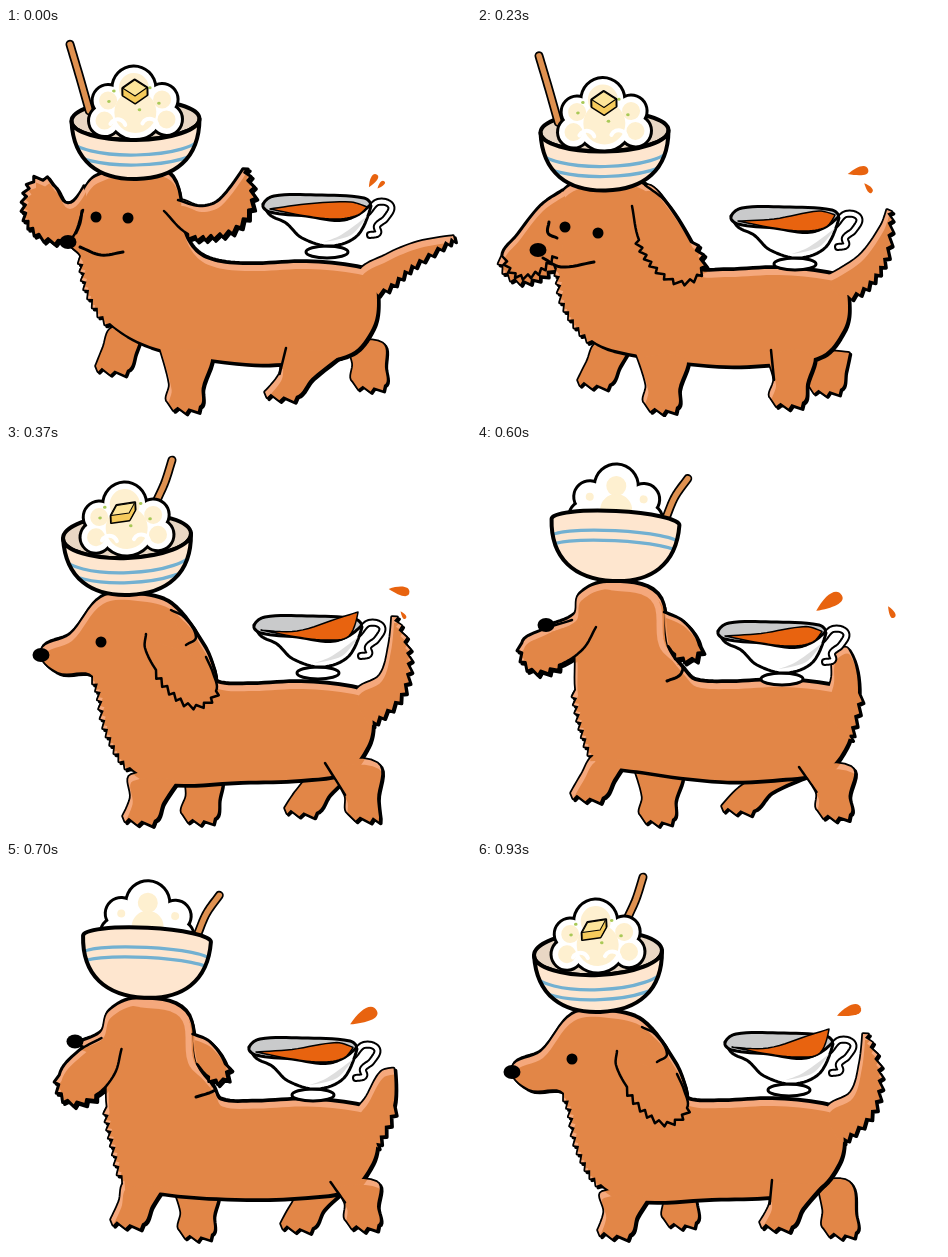
Animation, 465 px wide and 389 px high, one loop 1.06 s. Source, as an HTML page with a canvas:

```html
<!DOCTYPE html>
<html lang="en">
<head>
<meta charset="utf-8">
<title>Dachshund with mash and gravy</title>
<style>
  html, body { margin: 0; width: 100%; height: 100%; overflow: hidden; background: #fff; }
  canvas { display: block; }
</style>
</head>
<body>
<canvas id="stage" width="465" height="389"></canvas>
<script>
const g = document.getElementById('stage').getContext('2d');
const FUR = '#e28647', LIGHT = '#f5a87c', GRAVY = '#e8630f', CREAM = '#fee6cf', LOOP = 1060;

// Outlines are a few key points; a star makes the edge that follows shaggy.
// Legs are [hip x, hip y, half width, foot x, foot y]; drops are [x, y, length, angle].
const BARREL = '240,335 300,333 345,325 366,300 371,275 366,248 350,240 300,235 250,237 215,235';

const start = {
  front: '130,140 90,149 77,165 74,190 62,212 75,228* 83,262* 104,295 150,320',
  rear: '192,226 178,205 166,150',
  shift: [0, 0],
  ears: ['78,158 62,175 47,157* 28,154* 20,185* 33,206* 52,212 66,210 77,182',
         '172,172 194,178 213,172 237,141* 245,172* 230,198* 205,207* 182,206 158,183'],
  tail: '352,246 380,227 412,214 447,208* 405,236* 369,263',
  near: [[178, 320, 24, 179, 378], [312, 320, 32, 276, 368]],
  far: [[122, 300, 16, 107, 342], [358, 315, 18, 364, 357]],
  lines: ['74,219 95,227 117,224', '76,183 74,195 70,205'],
  glow: [], eyes: [[90, 189], [122, 190]], nose: [62, 214],
  bowl: [0, 129.5, 92], boat: [0, 0], wave: 0,
  drops: [[367, 153, 15, -1], [375, 157, 10, -.8]]
};

const low = {
  front: '130,150 90,160 73,190 62,214 62,230 80,240* 88,275* 115,312 157,326',
  rear: '202,222 186,190 168,158',
  shift: [0, 6],
  ears: ['86,162 64,177 40,207 25,228* 38,250* 62,247* 80,230',
         '168,157 188,173 214,214* 224,240* 205,253* 180,240* 162,212 155,178'],
  tail: '350,248 382,228 404,198 410,182* 406,230* 371,267',
  near: [[183, 325, 24, 185, 379], [314, 322, 20, 311, 374]],
  far: [[138, 315, 18, 118, 356], [355, 325, 17, 349, 361]],
  lines: ['66,230 84,239 117,234', '72,194 71,205 80,210'],
  glow: [], eyes: [[88, 199], [121, 205]], nose: [61, 222],
  bowl: [0, 127.5, 103.5], boat: [-3, 12], wave: 1,
  drops: [[381, 144, 21, -.2], [391, 160, 12, .9]]
};

const side = {
  front: '130,150 95,153 64,190 35,206 52,227 87,231* 102,284* 124,322 160,338',
  rear: '208,228 198,203 165,160',
  shift: [-5, 3],
  ears: ['140,189 139,203 150,225* 168,248* 190,260* 210,246 207,228 200,212',
         '165,165 178,172 190,192 180,200'],
  tail: '350,247 374,230 383,200 386,172* 400,208* 394,248* 364,277',
  near: [[150, 330, 25, 134, 375], [345, 318, 26, 359, 372]],
  far: [[198, 330, 15, 194, 373], [325, 330, 18, 296, 367]],
  lines: [], glow: [], eyes: [[95, 197]], nose: [35, 210],
  bowl: [1, 121, 91], boat: [-9, 4], wave: 2,
  drops: [[393, 146, 21, .2], null, [397, 170, 9, 1]]
};

const away = {
  front: '130,138 102,150 97,170 72,181 95,195 99,245* 107,285* 122,316 165,326',
  rear: '207,226 190,202 180,150',
  shift: [3, 1],
  ears: ['95,175 62,186 45,198* 55,224* 82,220 106,204 119,182',
         '187,167 207,177 222,200* 215,213* 198,209 191,201'],
  tail: '350,259 355,232 357,210 371,204 381,248* 370,293',
  near: [[135, 310, 17, 111, 352], [348, 322, 26, 358, 369]],
  far: [[180, 325, 22, 181, 374], [305, 332, 22, 262, 365]],
  lines: ['190,236 203,230 207,219'],
  glow: ['128,141 176,153 185,200 200,216'], eyes: [], nose: [69, 180],
  bowl: [2, 138.5, 77], boat: [-16, 10], wave: .8,
  drops: [[414, 167, 13, 1.1], [352, 158, 30, -.55]]
};

const back = {
  front: '130,137 103,150 92,172 70,181 98,200 104,245* 112,285* 122,325 160,337',
  rear: '207,226 190,202 178,150',
  shift: [-4, 6],
  ears: ['96,177 82,193 62,228* 68,252* 97,246 111,220 112,192',
         '186,177 204,184 224,217* 212,225 191,203'],
  tail: '347,253 372,232 407,195* 400,230* 366,274',
  near: [[145, 330, 24, 133, 371], [347, 318, 20, 357, 356]],
  far: [[197, 330, 19, 201, 370], [325, 330, 17, 322, 366]],
  lines: ['190,234 203,232 210,238'],
  glow: away.glow, eyes: [], nose: [69, 179],
  bowl: [2, 143.5, 76.5], boat: [-12, 8], wave: .8,
  drops: [null, [363, 153, 30, -.4]]
};

const rest = {
  ...side,
  near: [[150, 330, 25, 138, 372], [322, 318, 27, 300, 364]],
  far: [[198, 330, 15, 204, 360], [356, 320, 16, 364, 370]],
  drops: [[372, 150, 25, -.3]]
};

// Bowl views: rim sag, tilt, width of the white edge on the mash, spoon, butter [x, y, ux, uy, vx, vy].
const bowls = [
  { sag: 20, tilt: -.02, edge: 7, spoon: '-64,-77 -56,-48 -46,-10', butter: [0, -32, 6, -4, 6, 4] },
  { sag: 22, tilt: -.04, edge: 7, spoon: '48,-74 40,-52 31,-34', butter: [-3, -27, 9, -1, -3, 5] },
  { sag: -11, tilt: .05, edge: 12, spoon: '70,-47 58,-28 50,-6' }
];
const PUFFS = [[-31, 0, 16], [-27, -20, 16], [-1, -32, 22], [27, -20, 16], [31, 0, 16], [0, -8, 28]];

const points = s => s.split(' ').map(p => [...p.replace('*', '').split(',').map(Number), p.endsWith('*')]);
const mid = (a, b) => (a + b) / 2;

function along(p, u) {
  const t = u * (p.length - 1), i = Math.min(Math.floor(t), p.length - 2);
  return [0, 1].map(k => p[i][k] + (p[i + 1][k] - p[i][k]) * (t - i));
}

// Pose halfway between two others.
function between(a, b) {
  if (a == null || b == null) return null;
  if (typeof a === 'number') return mid(a, b);
  if (typeof a === 'string') {
    const p = points(a), q = points(b), long = p.length > q.length ? p : q, n = long.length - 1;
    return long.map((v, i) => {
      const s = along(p, i / n), e = along(q, i / n);
      return mid(s[0], e[0]) + ',' + mid(s[1], e[1]) + (v[2] ? '*' : '');
    }).join(' ');
  }
  if (Array.isArray(a)) return a.slice(0, b.length).map((v, i) => between(v, b[i]));
  return Object.fromEntries(Object.keys(a).map(k => [k, between(a[k], b[k])]));
}

// Smooth curve through key points, sharp at tight turns, with tufts on shaggy edges.
function trace(p, open) {
  const n = p.length, path = new Path2D();
  const at = i => open ? p[Math.max(0, Math.min(n - 1, i))] : p[(i + n) % n];
  const dir = (a, b) => {
    const x = b[0] - a[0], y = b[1] - a[1], d = Math.hypot(x, y) || 1;
    return [x / d, y / d, d];
  };
  const tangent = i => {
    const a = dir(at(i - 1), at(i)), b = dir(at(i), at(i + 1));
    return a[0] * b[0] + a[1] * b[1] < -.2 ? [0, 0] : dir(at(i - 1), at(i + 1));
  };
  const turn = Math.sign(p.reduce((sum, a, i) => sum + a[0] * at(i + 1)[1] - at(i + 1)[0] * a[1], 0));
  for (let i = 0; i < (open ? n - 1 : n); i++) {
    const a = at(i), b = at(i + 1), d = dir(a, b)[2], s = tangent(i), e = tangent(i + 1);
    const pos = t => [0, 1].map(k => {
      const r = 1 - t, c1 = a[k] + s[k] * d / 3, c2 = b[k] - e[k] * d / 3;
      return r * r * r * a[k] + 3 * r * r * t * c1 + 3 * r * t * t * c2 + t * t * t * b[k];
    });
    const steps = a[2] ? Math.max(1, Math.round(d / 9)) : 8;
    for (let k = 0; k < steps; k++) {
      path.lineTo(...pos(k / steps));
      if (!a[2]) continue;
      const t = (k + .75) / steps, [x, y] = pos(t), [dx, dy] = dir(pos(t - .02), pos(t + .02));
      path.lineTo(x + dy * turn * 4.5, y - dx * turn * 4.5);
    }
  }
  if (open) path.lineTo(...p[n - 1]);
  else path.closePath();
  return path;
}

const curve = (s, open) => trace(points(s), open);

function legPoints([hx, hy, w, fx, fy]) {
  const ankle = fx + (hx - fx) * .35;
  return [[hx - w, hy], [ankle - 15, fy - 22], [fx - 17, fy - 4, true],
          [fx + 14, fy], [ankle + 17, fy - 18], [hx + w, hy]];
}

function stroke(path, width, color = '#000') {
  g.strokeStyle = color;
  g.lineWidth = width;
  g.stroke(path);
}

function fill(path, color, edge = 0) {
  g.fillStyle = color;
  g.fill(path);
  if (edge) stroke(path, edge);
}

function oval(x, y, rx, ry, color, edge) {
  const path = new Path2D();
  path.ellipse(x, y, rx, ry, 0, 0, 7);
  fill(path, color, edge);
}

function moved(x, y, draw) {
  g.save();
  g.translate(x, y);
  draw();
  g.restore();
}

function drawDog(p) {
  const [dx, dy] = p.shift;
  const barrel = points(BARREL).map(([x, y]) => [x + dx, y + (y < 300 ? dy : dy / 3)]);
  const torso = trace([...points(p.front), ...barrel, ...points(p.rear)]);
  const near = p.near.map(legPoints);
  const parts = [torso, curve(p.tail), ...near.map(l => trace(l)), ...p.ears.map(s => curve(s))];
  parts.forEach(path => fill(path, LIGHT));
  g.globalCompositeOperation = 'source-atop';
  moved(2, 6, () => parts.forEach(path => fill(path, FUR)));
  p.glow.forEach(s => stroke(curve(s, true), 6, LIGHT));
  p.ears.forEach(s => stroke(curve(s, true), 2.5));
  stroke(trace(near[1].slice(0, 2), true), 2.5);
  p.lines.forEach(s => stroke(curve(s, true), 3));
  // Ink goes under the fur, heavier on the lower right and along the back.
  g.globalCompositeOperation = 'destination-over';
  for (const d of [0, 2]) moved(d, d, () => parts.forEach(path => stroke(path, 3.5)));
  moved(1, -2, () => stroke(torso, 3.5));
  for (const leg of p.far.map(l => trace(legPoints(l)))) {
    fill(leg, FUR);
    for (const d of [0, 1.5]) moved(d, d, () => stroke(leg, 3.5));
  }
  g.globalCompositeOperation = 'source-over';
  p.eyes.forEach(([x, y]) => oval(x, y, 5.5, 5.5, '#000'));
  oval(...p.nose, 8.5, 7, '#000');
}

function drawBoat(w) {
  const handle = curve('362,184 372,174 385,178 380,190 371,198 372,205 364,207', true);
  stroke(handle, 8);
  stroke(handle, 4, '#fff');
  oval(321, 224, 21, 6, '#fff', 3);
  fill(curve('257,176 264,187 280,195 296,210 325,218 352,207 365,178 310,168'), '#fff', 3);
  fill(curve('318,214 345,207 361,188 335,207'), '#dedede');
  fill(curve('257,177 268,168 310,167 358,170 364,177 338,192 300,188 264,184'), '#c9cacb', 3);
  fill(curve(`264,181 300,${176 + 3 * w} 345,${174 - 3 * w} 361,${179 - 4 * w * w} 352,187 330,191 300,188`), GRAVY, 1.5);
}

function drawButter([x, y, ux, uy, vx, vy]) {
  const top = new Path2D();
  for (const [a, b] of [[1, 1], [1, -1], [-1, -1], [-1, 1]]) top.lineTo(x + a * ux + b * vx, y + a * uy + b * vy);
  top.closePath();
  for (const paint of [() => stroke(top, 3), () => fill(top, '#f6cb5c')])
    for (let d = 0; d < 8; d++) moved(0, d, paint);
  fill(top, '#fde59a', 1);
}

function drawBowl({ sag, tilt, edge, spoon, butter }) {
  const dip = Math.abs(sag), facing = sag > 0;
  g.rotate(tilt);
  if (facing) oval(0, 0, 64, dip, '#e9d7c4', 4);
  const handle = curve(spoon, true);
  stroke(handle, 9);
  stroke(handle, 5.5, '#df9150');
  moved(0, facing ? 0 : -4, () => {
    for (const [grow, color] of [[1.5, '#000'], [-1.5, '#fff'], [-edge, '#fef0d0']])
      PUFFS.forEach(([x, y, r]) => oval(x, y, r + grow, r + grow, color));
  });
  if (facing) {
    for (let i = 0; i < 5; i++) {
      const a = 2.4 * i + .5;
      oval(27 * Math.cos(a), 12 * Math.sin(a) - 22, 1.8, 1.5, '#a9c957');
    }
    for (const x of [-18, 14]) {
      const shine = new Path2D();
      shine.arc(x, 7, 8, 3.6, 6);
      stroke(shine, 4, '#fff');
    }
    drawButter(butter);
  }
  const body = new Path2D();
  body.ellipse(0, 0, 64, dip, 0, Math.PI, 0, facing);
  body.bezierCurveTo(63, 40, 38, 59, 0, 59);
  body.bezierCurveTo(-38, 59, -63, 40, -64, 0);
  body.closePath();
  fill(body, CREAM);
  g.save();
  g.clip(body);
  for (const y of [18, 28]) {
    const band = new Path2D();
    band.ellipse(0, y, 64, dip * .85, 0, Math.PI, 0, facing);
    stroke(band, 3.2, '#72b0d1');
  }
  g.restore();
  stroke(body, 4);
}

function drawDrop([x, y, size, angle]) {
  const path = new Path2D();
  path.moveTo(-size / 2, 0);
  path.bezierCurveTo(0, -size * .3, size / 2, -size * .35, size / 2, 0);
  path.bezierCurveTo(size / 2, size * .3, 0, size * .2, -size / 2, 0);
  moved(x, y, () => {
    g.rotate(angle);
    fill(path, GRAVY);
  });
}

function drawPose(p) {
  g.clearRect(0, 0, 465, 389);
  drawDog(p);
  moved(...p.boat, () => drawBoat(p.wave));
  const [view, x, y] = p.bowl;
  moved(x, y, () => drawBowl(bowls[Math.floor(view)]));
  p.drops.filter(Boolean).forEach(drawDrop);
}

const steps = [
  [0, start], [130, between(start, low)], [230, low],
  [370, side], [470, between(side, away)], [600, away],
  [700, between(away, back)], [830, back], [930, rest]
];

g.lineJoin = g.lineCap = 'round';
const began = performance.now();
function tick() {
  const t = (performance.now() - began) % LOOP;
  drawPose(steps.filter(([at]) => at <= t).pop()[1]);
  requestAnimationFrame(tick);
}
tick();
</script>
</body>
</html>
```
